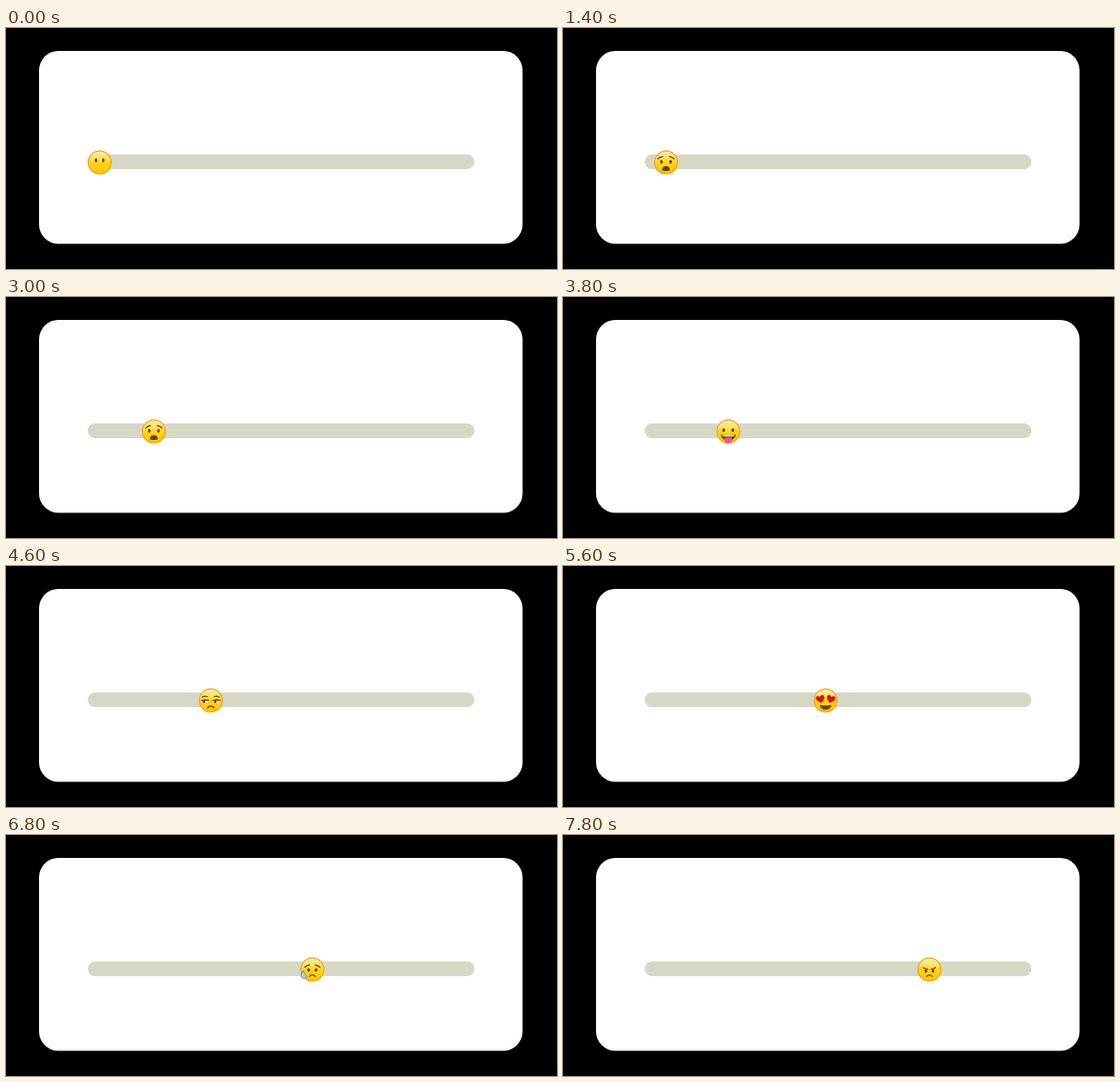
Recreate the animation shown at these times as an HTML page. Size 600 by 263 pixels, loop 8 s.

```html
<!DOCTYPE html>
<html lang="en">
<head>
<meta charset="utf-8">
<title>Emoji slider</title>
<style>
html, body { margin: 0; width: 100%; height: 100%; overflow: hidden; background: #000; }
svg { display: block; width: 100vw; height: 100vh; }
.ink { fill: #6b3f06; }
.line { fill: none; stroke: #6b3f06; stroke-width: 1.3; stroke-linecap: round; }
</style>
</head>
<body>
<svg viewBox="0 0 600 263">
  <defs>
    <linearGradient id="skin" x1="0" y1="0" x2="0" y2="1">
      <stop offset="0" stop-color="#fdeeb0"/>
      <stop offset=".3" stop-color="#fce36a"/>
      <stop offset=".5" stop-color="#fdd41b"/>
      <stop offset="1" stop-color="#ffc800"/>
    </linearGradient>
  </defs>
  <rect width="600" height="263"/>
  <rect x="36" y="25" width="526.5" height="210.5" rx="21" fill="#fff"/>
  <rect x="89" y="138" width="421" height="16" rx="8" fill="#d7d7c6"/>
  <g id="thumb">
    <circle r="12.5" fill="url(#skin)" stroke="#f9a00f" stroke-width="1.2"/>
    <g id="face"></g>
  </g>
</svg>
<script>
const LOOP = 8000, STEP = 200;
const thumb = document.getElementById('thumb');
const face = document.getElementById('face');

const line = d => `<path class="line" d="${d}"/>`;
const shape = (d, fill = '#6b3f06') => `<path d="${d}" fill="${fill}"/>`;
const eyes = (x, y, rx = 1.4, ry = 2) => [-x, x].map(cx =>
  `<ellipse class="ink" cx="${cx}" cy="${y}" rx="${rx}" ry="${ry}"/>`).join('');
const mirror = s => s + `<g transform="scale(-1 1)">${s}</g>`;
const heart = `<g transform="translate(5.8 -1.7) rotate(12)">${
  shape('M0 4.6C-3 2.4-4.7.6-4.7-1.4C-4.7-4.1-1.2-4.5 0-2C1.2-4.5 4.7-4.1 4.7-1.4C4.7.6 3 2.4 0 4.6Z', '#d8131b')}</g>`;

const faces = {
  silent: eyes(4, -2.3, 1.3, 2.2),
  anguished: eyes(5, -.7) + mirror(line('M3.8-6.4Q6.6-6.2 8.8-3.8')) +
    shape('M-4.2 8.2C-4.6 2.6 4.6 2.6 4.2 8.2C4 9.7-4 9.7-4.2 8.2Z'),
  tongue: eyes(5, -1.4) +
    shape('M-8.2 3.4Q0 5.2 8.2 3.4C7.6 8 4 10 0 10S-7.6 8-8.2 3.4Z') +
    shape('M-6.6 3.9Q0 5.4 6.6 3.9L6.2 5Q0 6.3-6.2 5Z', '#fff') +
    shape('M-4 7Q0 5.6 4 7V9.4A4 3.7 0 0 1-4 9.4Z', '#fb4f91'),
  unamused: mirror(
    shape('M2.7.1Q6.4-.8 9.8.1Q9 3 6.3 3Q3.5 3 2.7.1Z', '#fff') +
    line('M2.5 0Q6.4-.9 10 0') + line('M3.8-4.2Q6.8-5.2 9.2-3.7')) +
    '<circle class="ink" cx="-7.3" cy="1.3" r="1.5"/><circle class="ink" cx="5" cy="1.3" r="1.5"/>' +
    line('M-3.6 8Q0 4.4 3.6 8'),
  love: mirror(heart) +
    shape('M-6.2 4.8Q0 6.5 6.2 4.8C6 8.6 3.2 10 0 10S-6 8.6-6.2 4.8Z'),
  tearful: eyes(4, .6, 1.4, 2) + mirror(line('M3.2-4.9Q5.8-4.6 8.2-2.4')) +
    line('M-3.3 7.6Q0 4.3 3.3 7.6') +
    '<path d="M-10.5 1.4C-9.2 3.6-6.6 6.2-6.8 8.4A2.9 2.9 0 0 1-12 8C-12.2 5.8-10.9 3.8-10.5 1.4Z" fill="#a5d8f7" stroke="#4384bd" stroke-width=".8"/>',
  angry: eyes(3.9, 1.7, 1.4, 1.8) + mirror(line('M2.2-.2Q4.2-.5 6.5-2')) +
    line('M-3.2 7.6Q0 4.8 3.2 7.6')
};

// [time, face shown from then on]
const moods = [[0, 'silent'], [600, 'anguished'], [3200, 'tongue'], [4200, 'unamused'],
  [5200, 'love'], [6200, 'tearful'], [7200, 'angry']];

// [time, thumb centre]
const path = [[0, 102], [1000, 102], [2000, 127.5], [2200, 127.5], [2400, 138],
  [3000, 161], [3400, 161], [3800, 180], [4600, 223], [5600, 286], [5800, 287.7],
  [6800, 333.6], [7000, 356], [7800, 399], [8000, 399]];

// The drag is sampled every STEP ms
function place(t) {
  const i = path.findIndex(p => p[0] > t);
  const [t0, x0] = path[i - 1], [t1, x1] = path[i];
  return x0 + (x1 - x0) * (t - t0) / (t1 - t0);
}

let shown;
function draw(ms) {
  const t = Math.floor(ms % LOOP / STEP) * STEP;
  const mood = moods.filter(m => m[0] <= t).pop()[1];
  thumb.setAttribute('transform', `translate(${place(t).toFixed(2)} 146.7)`);
  if (mood !== shown) face.innerHTML = faces[shown = mood];
}

const start = performance.now();
function tick() {
  draw(performance.now() - start);
  requestAnimationFrame(tick);
}
tick();
</script>
</body>
</html>
```
